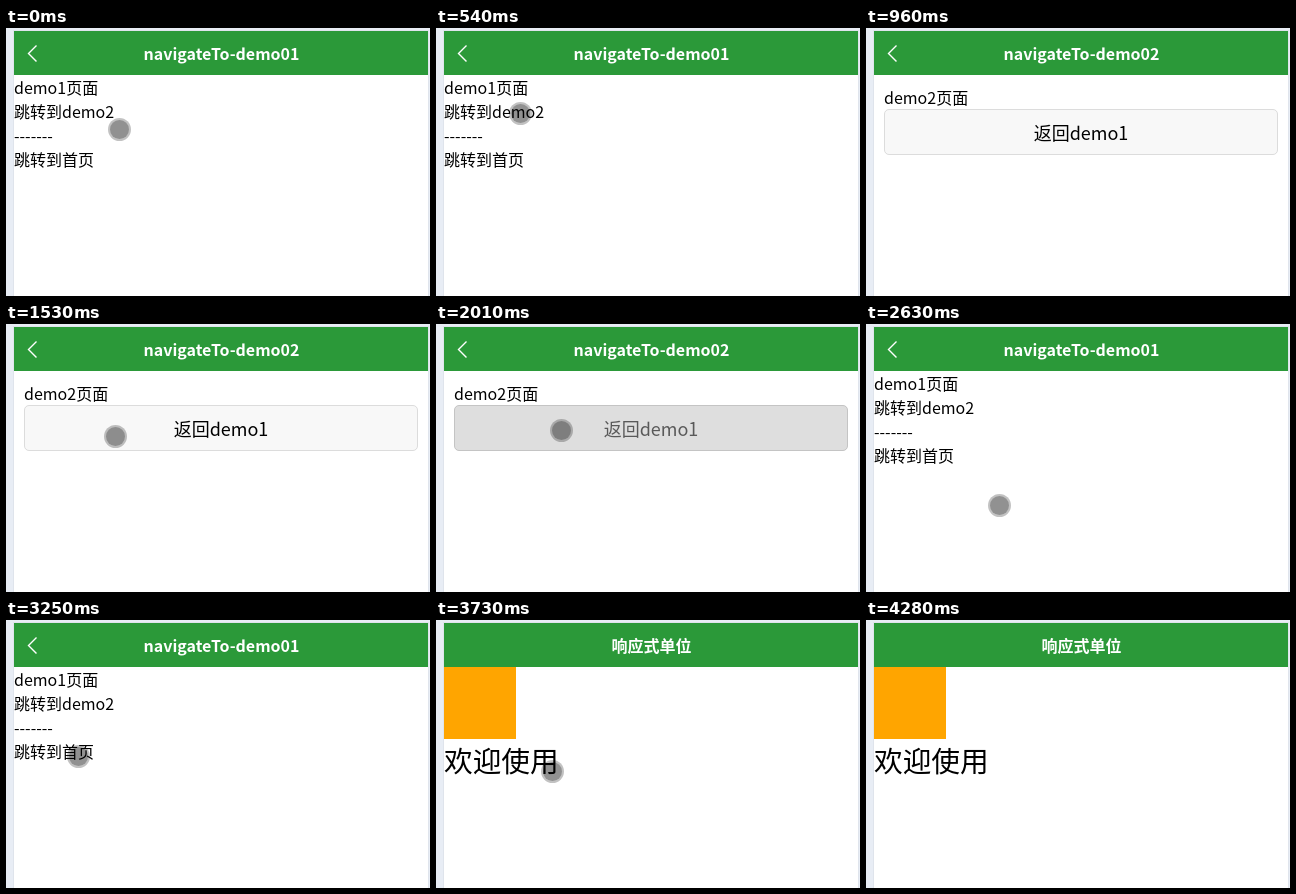
These frames come from a looping animation (424x268 px, 4880 ms). An HTML page with a canvas:

```html
<!DOCTYPE html>
<html lang="zh-CN">
<head>
<meta charset="utf-8">
<style>
html, body { margin: 0; height: 100%; overflow: hidden; background: #fff; }
canvas { display: block; }
</style>
</head>
<body>
<canvas id="stage" width="424" height="268"></canvas>
<script>
const LOOP = 4880;
const TICK = LOOP / 70; // the pointer is sampled at this interval
const FONT = '"Noto Sans CJK SC", "Noto Sans CJK", sans-serif';
const ctx = document.getElementById('stage').getContext('2d', { alpha: false });

// Where the hand rests or turns; the pointer eases between these
const stops = [
  { t: 0, x: 113, y: 101 },
  { t: 540, x: 83, y: 85 },
  { t: 680, x: 83, y: 85 },
  { t: 1110, x: 330, y: 225 },
  { t: 1320, x: 75, y: 100 },
  { t: 1530, x: 119, y: 116 },
  { t: 1930, x: 125, y: 106 },
  { t: 2080, x: 125, y: 106 },
  { t: 2290, x: 258, y: 230 },
  { t: 2630, x: 125, y: 178 },
  { t: 3050, x: 72, y: 136 },
  { t: 3500, x: 72, y: 136 },
  { t: 4280, x: 353, y: 235 }
];

const ease = k => k * k * (3 - 2 * k);

function pointerAt(t) {
  const i = stops.findIndex(s => s.t > t);
  const a = stops[i - 1], b = stops[i];
  const k = ease((t - a.t) / (b.t - a.t));
  return [a.x + (b.x - a.x) * k, a.y + (b.y - a.y) * k];
}

function rect(x, y, w, h, color) {
  ctx.fillStyle = color;
  ctx.fillRect(x, y, w, h);
}

function text(str, x, y, { size = 16, color = '#000', align = 'left', weight = 400 } = {}) {
  ctx.font = `${weight} ${size}px ${FONT}`;
  ctx.fillStyle = color;
  ctx.textAlign = align;
  ctx.fillText(str, x, y);
}

function frame(title, hasBack) {
  rect(0, 0, 424, 268, '#e8edf5');
  rect(7, 2, 416, 266, '#dfe4ec');
  rect(8, 3, 414, 265, '#fff');
  rect(8, 3, 414, 44, '#2b9939');
  text(title, 215.5, 32, { color: '#fff', align: 'center', weight: 700 });
  if (!hasBack) return;
  ctx.strokeStyle = '#fff';
  ctx.lineWidth = 1.4;
  ctx.beginPath();
  ctx.moveTo(30.5, 17.5);
  ctx.lineTo(22.5, 25.5);
  ctx.lineTo(30.5, 33.5);
  ctx.stroke();
}

function firstPage() {
  frame('navigateTo-demo01', true);
  ['demo1页面', '跳转到demo2', '-------', '跳转到首页']
    .forEach((line, i) => text(line, 8, 66 + 24 * i));
}

function secondPage(pressed) {
  frame('navigateTo-demo02', true);
  text('demo2页面', 18, 76);
  ctx.beginPath();
  ctx.roundRect(18.5, 81.5, 393, 45, 4.5);
  ctx.fillStyle = pressed ? '#dedede' : '#f8f8f8';
  ctx.fill();
  ctx.strokeStyle = pressed ? '#c4c4c4' : '#dcdcdc';
  ctx.lineWidth = 1;
  ctx.stroke();
  text('返回demo1', 215, 112, {
    size: 18, align: 'center', color: pressed ? 'rgba(0,0,0,.6)' : '#000'
  });
}

function homePage() {
  frame('响应式单位', false);
  rect(8, 47, 72, 72, '#ffa500');
  text('欢迎使用', 8, 152, { size: 28.7 });
}

function disc(x, y, radius, color) {
  ctx.beginPath();
  ctx.arc(x, y, radius, 0, 2 * Math.PI);
  ctx.fillStyle = color;
  ctx.fill();
}

function pointer(x, y) {
  const cx = Math.round(x) + 0.5, cy = Math.round(y) + 0.5;
  disc(cx, cy, 11.5, 'rgba(0,0,0,.24)');
  disc(cx, cy, 9.5, 'rgba(0,0,0,.25)');
}

function draw(now) {
  const t = now % LOOP;
  if (t < 680 || (t >= 2080 && t < 3460)) firstPage();
  else if (t < 2080) secondPage(t >= 1880);
  else homePage();
  const away = (t >= 960 && t < 1110) || t >= 4280;
  if (!away) pointer(...pointerAt(Math.floor(t / TICK) * TICK));
  requestAnimationFrame(draw);
}
requestAnimationFrame(draw);
</script>
</body>
</html>
```
